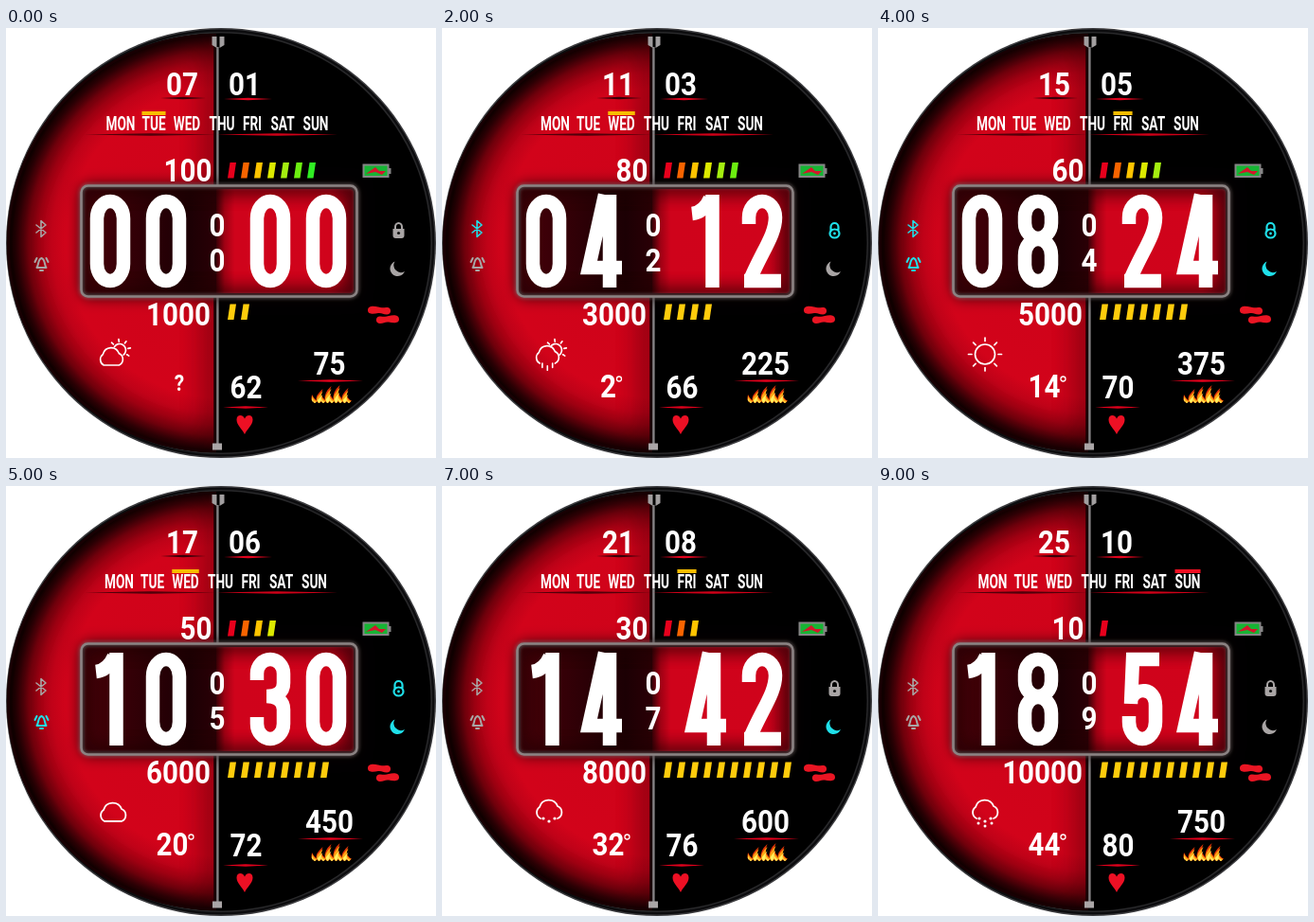
Write an HTML page with a canvas that moves like this. It is 454x454 px and loops after 10000 ms.

```html
<!DOCTYPE html>
<html lang="en">
<head>
<meta charset="utf-8">
<title>Watch face</title>
<style>
html, body { margin: 0; width: 100%; height: 100%; overflow: hidden; background: #fff; }
canvas { display: block; width: 454px; height: 454px; }
</style>
</head>
<body>
<canvas id="face" width="454" height="454"></canvas>
<script>
const ctx = document.getElementById('face').getContext('2d');
const TAU = Math.PI * 2;
const CYAN = '#1fe0ea', GRAY = '#a9a5a5';
const DAYS = ['MON', 'TUE', 'WED', 'THU', 'FRI', 'SAT', 'SUN'];
const DAY_X = [121, 156, 191, 228, 260, 292, 327];
const DAY_OF_STEP = [1, 6, 2, 0, 4, 2, 6, 4, 2, 6];
const SKY = ['cloudy', 'cloudy', 'showers', 'snowShowers', 'sunny', 'overcast', 'rain', 'snow', 'heavyRain', 'heavySnow'];
const CHARGE = ['#e8001c', '#f86400', '#ffc400', '#dcea00', '#a4ee10', '#6cee10', '#30ee24'];

// Condensed lettering styles
const NUMBER = { size: 34, narrow: 0.87 };
const WEEK = { size: 21, narrow: 0.65 };
const MARK = { size: 24, narrow: 0.87 };

// Centre lines of the tall clock digits in a 42 x 98 cell
const DIGITS = {
  0: 'M7 25A14 18 0 0 1 35 25V73A14 18 0 0 1 7 73Z',
  1: 'M27.5 98V0M6 20C15 19 21 13 25 4',
  2: 'M7 31V24A14 17 0 0 1 35 24C35 42 22 58 9 88M2 91H41',
  3: 'M7 29V22A14 15 0 0 1 35 22V32C35 42 28 46 17 46C28 46 35 51 35 60V75A14 16 0 0 1 7 75V68',
  4: 'M29 98V0M24 0L7 77H42',
  5: 'M39 7H11L9 54M9 50C14 36 35 36 35 56V73A14 18 0 0 1 7 73V67',
  6: 'M27 0C20 22 7 44 7 62V73A14 18 0 0 0 35 73V62A14 17 0 0 0 9 56',
  8: 'M7 23A14 16 0 0 1 35 23V30A14 16 0 0 1 7 30ZM7 64A14 17 0 0 1 35 64V74A14 17 0 0 1 7 74Z'
};
const CLOUD = 'M8 20A7 7 0 0 1 7 8A10 10 0 0 1 26 7A7 7 0 0 1 26 20';

const pad = n => String(n).padStart(2, '0');

function at(x, y, draw) {
  ctx.save();
  ctx.translate(x, y);
  draw();
  ctx.restore();
}

function stroke(d, color, width) {
  ctx.strokeStyle = color;
  ctx.lineWidth = width;
  ctx.stroke(new Path2D(d));
}

function fill(d, color) {
  ctx.fillStyle = color;
  ctx.fill(new Path2D(d));
}

function dot(x, y, r, color) {
  ctx.fillStyle = color;
  ctx.beginPath();
  ctx.arc(x, y, r, 0, TAU);
  ctx.fill();
}

function ring(x, y, r) {
  ctx.beginPath();
  ctx.arc(x, y, r, 0, TAU);
  ctx.stroke();
}

// Returns the drawn width
function text(str, x, y, align = 'center', style = NUMBER) {
  let width;
  at(x, y, () => {
    ctx.scale(style.narrow, 1);
    ctx.font = `600 ${style.size}px Roboto, sans-serif`;
    ctx.textAlign = align;
    ctx.fillStyle = '#fff';
    ctx.fillText(str, 0, 0);
    width = ctx.measureText(str).width * style.narrow;
  });
  return width;
}

function addStops(gradient, stops) {
  for (const [pos, color] of stops) gradient.addColorStop(pos, color);
  return gradient;
}

// Dark inner edge, softening towards the middle of the shape
function vignette(path, color, width, blur) {
  ctx.save();
  ctx.clip(path);
  ctx.strokeStyle = ctx.shadowColor = color;
  ctx.lineWidth = width;
  ctx.shadowBlur = blur;
  ctx.stroke(path);
  ctx.stroke(path);
  ctx.restore();
}

// Thin line with pointed ends
function taper(x1, x2, y, color) {
  const mid = (x1 + x2) / 2;
  fill(`M${x1} ${y}L${mid} ${y - 1.2}L${x2} ${y}L${mid} ${y + 1.2}Z`, color);
}

function drawCase() {
  ctx.fillStyle = '#fff';
  ctx.fillRect(0, 0, 454, 454);
  dot(227, 227, 227, '#3c3c3f');
  dot(227, 227, 225.5, '#0c0c0e');
  dot(227, 227, 223, '#29292b');
  dot(227, 227, 221.5, '#000');

  const half = new Path2D('M222 6A221 221 0 0 0 222 448Z');
  ctx.fillStyle = addStops(ctx.createRadialGradient(227, 227, 0, 227, 227, 221), [
    [0, '#cc0319'], [0.74, '#d2031a'], [0.81, '#c00218'], [0.87, '#a00113'],
    [0.92, '#78010d'], [0.97, '#340006'], [1, '#100002']
  ]);
  ctx.fill(half);
  vignette(half, '#180003', 5, 30);

  ctx.fillStyle = '#858284';
  ctx.fillRect(222.2, 20, 2.4, 420);
  fill('M217.5 9H222.5V21L217.5 18ZM225.5 9H230.5V18L225.5 21Z', '#a19e9f');
  ctx.fillStyle = '#aaa6a7';
  ctx.fillRect(218, 438.5, 10, 7);

  taper(163, 211, 74, '#3a0008');
  taper(230, 281, 75, '#e0041e');
  taper(83, 222, 112.5, '#50000a');
  taper(222, 350, 112.5, '#d00018');
  taper(229, 277, 400.5, '#e0001c');
  taper(308, 377, 372.5, '#e8001c');
}

function drawPanel() {
  const box = new Path2D();
  box.roundRect(79.5, 166.5, 291, 117, 7);
  ctx.save();
  ctx.shadowColor = '#100002';
  ctx.shadowBlur = 16;
  ctx.fillStyle = '#200004';
  ctx.fill(box);
  ctx.clip(box);
  ctx.shadowBlur = 0;
  ctx.fillStyle = addStops(ctx.createLinearGradient(80, 0, 222, 0), [
    [0, '#480009'], [0.5, '#2c0006'], [0.8, '#1c0004'], [1, '#2a0006']
  ]);
  ctx.fillRect(79, 166, 143, 118);
  ctx.fillStyle = addStops(ctx.createLinearGradient(222, 0, 371, 0), [
    [0, '#3a0007'], [0.06, '#a00114'], [0.13, '#cf031b'], [0.8, '#d0031b'], [1, '#900012']
  ]);
  ctx.fillRect(222, 166, 149, 118);
  ctx.restore();
  vignette(box, '#200004', 7, 19);

  ctx.save();
  ctx.shadowColor = '#8e8585';
  ctx.shadowBlur = 4;
  ctx.strokeStyle = '#8b8383';
  ctx.lineWidth = 2.6;
  ctx.stroke(box);
  ctx.restore();
}

function drawDigit(d, x) {
  at(x, 176, () => stroke(DIGITS[d], '#fff', 14.5));
}

function drawWeek(active) {
  const shift = active % 2 === 0 && active < 5 ? -1.5 : 0;
  DAYS.forEach((name, i) => {
    const x = DAY_X[i] + shift;
    const w = text(name, x, 108, 'center', WEEK);
    if (i === active) {
      ctx.fillStyle = i === 6 ? '#ee1022' : '#f8bd00';
      ctx.fillRect(x - w / 2, 88, w, 4);
    }
  });
}

function drawBars(count, y, color) {
  for (let i = 0; i < count; i++) {
    const x = 234 + i * 14;
    fill(`M${x + 2.5} ${y}H${x + 9}L${x + 6.5} ${y + 16.5}H${x}Z`, color(i));
  }
}

function drawRays(x, y, r1, r2, n, from, span) {
  ctx.beginPath();
  for (let i = 0; i < n; i++) {
    const a = from + span * i / n;
    ctx.moveTo(x + r1 * Math.cos(a), y + r1 * Math.sin(a));
    ctx.lineTo(x + r2 * Math.cos(a), y + r2 * Math.sin(a));
  }
  ctx.stroke();
}

function drawFall(snow, heavy) {
  [11, 17, 23].forEach((x, i) => {
    const y = 20 + (i === 1 ? 3 : 0);
    if (!snow) {
      stroke(`M${x} ${y}v${heavy ? 7 : 4.5}`, '#fff', 1.8);
      return;
    }
    dot(x, y, 1.6, '#fff');
    if (heavy) dot(x + i - 1, y + 5, 1.5, '#fff');
  });
}

function drawSky(kind) {
  ctx.save();
  ctx.strokeStyle = '#fff';
  ctx.lineWidth = 1.7;
  ctx.lineCap = 'round';
  if (kind === 'sunny') {
    ring(113, 344.5, 10.5);
    drawRays(113, 344.5, 14, 17.5, 8, 0, TAU);
  } else {
    const sun = /cloudy|showers/i.test(kind);
    const dry = /cloudy|overcast/.test(kind);
    if (sun) {
      ctx.beginPath();
      ctx.arc(120, 340, 6.5, -2.6, 0.9);
      ctx.stroke();
      drawRays(120, 340, 9, 11.5, 5, -2.4, 3.7);
    }
    at(96, dry ? (sun ? 337 : 334) : (sun ? 335 : 331), () => {
      if (sun) ctx.scale(0.9, 0.95);
      stroke(CLOUD + (dry ? 'Z' : ''), '#fff', 1.8);
      if (!dry) drawFall(/snow/.test(kind.toLowerCase()), /heavy/.test(kind));
    });
  }
  ctx.restore();
}

function drawStatus(n) {
  const tint = (from, to) => n >= from && n < to ? CYAN : GRAY;
  const lock = tint(2, 6);
  ctx.save();
  ctx.lineCap = ctx.lineJoin = 'round';
  at(37, 212, () => stroke('M-5 -4L5 4L0 8.5V-8.5L5 -4L-5 4', tint(1, 5), 1.6));
  at(37.5, 249, () => stroke('M-5 4C-3 2 -4 -5 0 -6C4 -5 3 2 5 4ZM-1.5 7H1.5M-7 -2L-5 -6M7 -2L5 -6', tint(3, 7), 2));
  at(414.5, 214, () => {
    if (lock === CYAN) {
      stroke('M-4 0V-4A4 4 0 0 1 4 -4V-1M-5 3A5 4.5 0 1 1 5 3A5 4.5 0 1 1 -5 3', lock, 2.2);
      dot(0, 3, 1.4, lock);
    } else {
      stroke('M-3.5 -1V-4A3.5 4 0 0 1 3.5 -4V-1', lock, 2);
      fill('M-6 -2H6V5Q6 8 3 8H-3Q-6 8 -6 5Z', lock);
      dot(0, 2.5, 1.6, '#111');
    }
  });
  at(413.5, 254, () => fill('M-3 -7.4A8 8 0 1 0 7.4 3A7.6 7.6 0 0 1 -3 -7.4Z', tint(4, 8)));
  ctx.restore();
}

function drawShoe(x, y, dir) {
  at(x, y, () => {
    ctx.scale(dir, 1);
    fill('M-12 0C-12 -5 -6 -5 -1 -3.5C3 -2 6 -3.5 9 -3C13.5 -2 13 4.5 8 4.5C4 4.5 3 2.5 -1 3C-6 4 -12 4.5 -12 0Z', '#ea1523');
  });
}

function drawFlames() {
  const layers = [['#e03408', 1], ['#ffa414', 0.85], ['#fff060', 0.6]];
  const tops = [9, 15, 10, 18, 11, 19, 12, 16, 9];
  for (const [color, k] of layers) {
    tops.forEach((h, i) => {
      const x = 326 + i * 4.5, lean = i % 2 ? 4 : -3, t = 396 - h * k;
      fill(`M${x - 3 * k} 393Q${x - 4 * k} ${t + 7} ${x + lean} ${t}Q${x + k} ${t + 7} ${x + 3 * k} 393Q${x} 399 ${x - 3 * k} 393Z`, color);
    });
  }
}

function drawBadges() {
  ctx.fillStyle = '#858585';
  ctx.fillRect(376.5, 143.5, 28, 14.5);
  ctx.fillRect(404, 148, 2.5, 6);
  ctx.fillStyle = '#16b534';
  ctx.fillRect(378.5, 145.5, 24, 10.5);
  fill('M380 154L390 147L394 151L401 151L397 155L390 152Z', '#d5162b');

  drawShoe(394, 298, 1);
  drawShoe(403, 307.5, -1);
  fill('M252 429C249 423 243.5 419 243.5 413.5C243.5 408 250 407.5 252 412.5C254 407.5 260.5 408 260.5 413.5C260.5 419 255 423 252 429Z', '#ed1024');
  drawFlames();
}

function drawTemperature(n) {
  if (n === 0) {
    text('?', 183, 382.5, 'center', MARK);
    return;
  }
  const w = text(6 * n - 10, 175.5, 390);
  ctx.strokeStyle = '#fff';
  ctx.lineWidth = 1.3;
  ring(175.5 + w / 2 + 3, 370.5, 2.5);
}

function draw(n) {
  drawCase();
  drawPanel();
  const charge = 100 - 10 * n, walked = 1000 * (n + 1);

  text(pad(7 + 2 * n), 186, 70.5);
  text(pad(n + 1), 252, 70.5);
  drawWeek(DAY_OF_STEP[n]);
  text(charge, 217.5, 161.5, 'right');
  drawBars(Math.ceil(charge * 7 / 100), 142, i => CHARGE[i]);
  text(walked, 216, 313.5, 'right');
  drawBars(Math.min(10, Math.ceil(walked / 800)), 291.5, () => '#ffcc0c');

  const clock = pad(2 * n) + pad(6 * n);
  [89, 148, 258, 317].forEach((x, i) => drawDigit(clock[i], x));
  text('0', 223, 219.5);
  text(n, 223, 256.5);

  drawStatus(n);
  drawSky(SKY[n]);
  drawTemperature(n);
  text(62 + 2 * n, 253.5, 391);
  text(75 * (n + 1), 341.5, 365.5);
  drawBadges();
}

function tick() {
  draw(Math.floor(performance.now() / 1000) % 10);
  requestAnimationFrame(tick);
}
tick();
</script>
</body>
</html>
```
